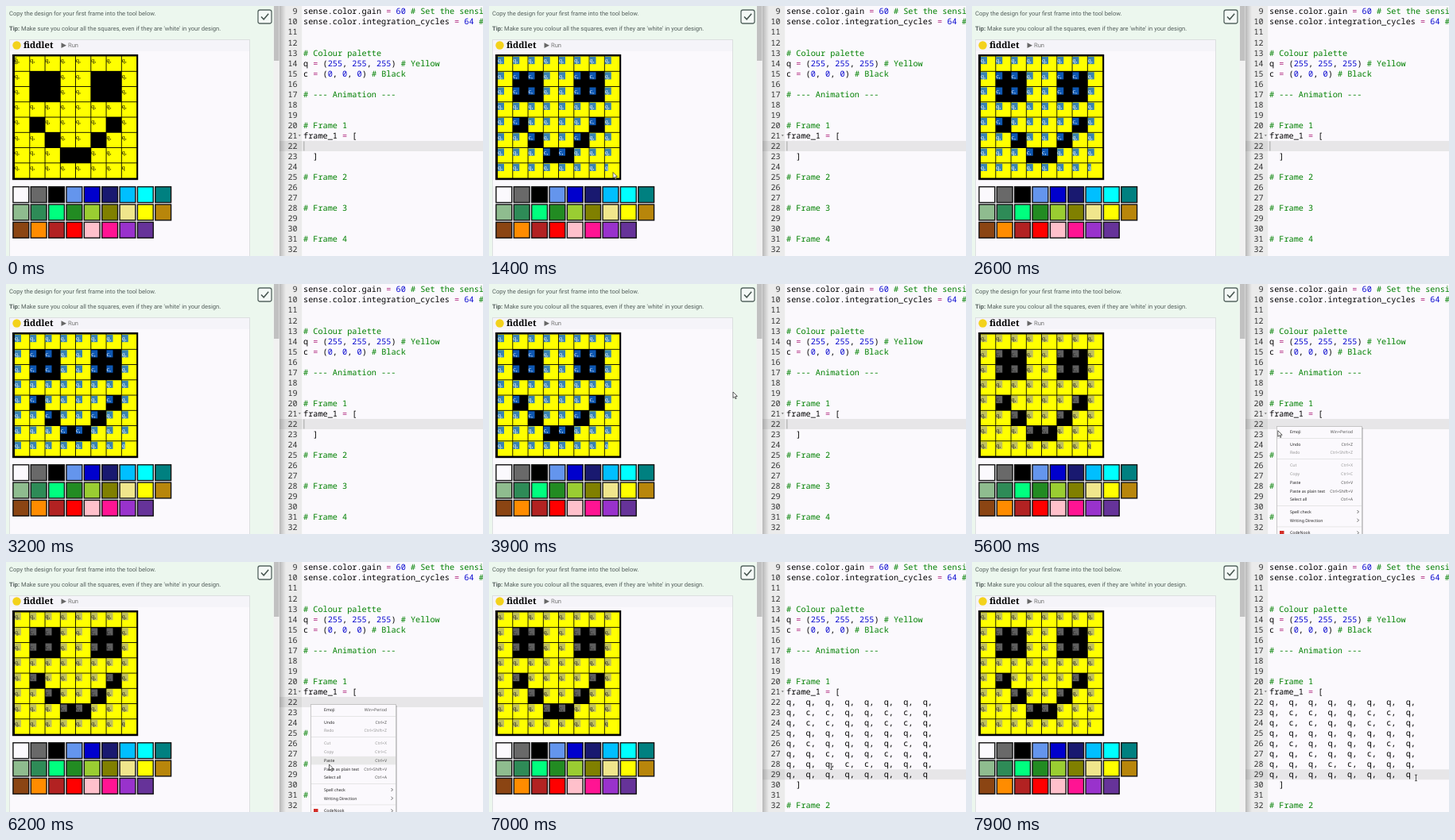
Recreate the animation shown at these times as an HTML page. Size 600 px wide and 315 px high, loop 8 s.

```html
<!DOCTYPE html>
<html lang="en">
<head>
<meta charset="utf-8">
<title>Copying a design into code</title>
<style>
  html, body { margin: 0; width: 100%; height: 100%; overflow: hidden; }
  svg { display: block; width: 600px; height: 315px; }
  text { white-space: pre; text-rendering: geometricPrecision; }
  .ui { font: 7.6px Roboto, sans-serif; fill: #55605d; }
  .brand { font: bold 11.2px "Noto Serif", serif; }
  .code { font: 500 10.23px "Noto Sans Mono", monospace; fill: #000; }
  .num { font: 10.1px "Noto Sans Mono", monospace; fill: #333; text-anchor: end; }
  .comment { fill: #008000; }
  .value { fill: #0a0ad0; }
  .operator { fill: #b0287f; }
  .cell text { font: 8px "Liberation Serif", serif; }
  .cell .mark { fill: none; }
  .cell.on .mark { fill: #1069d6; fill-opacity: .83; }
  .cell.on text { fill: #fff; }
  .idle .cell.on .mark { fill: #989898; fill-opacity: .62; }
  .idle .cell.on text { fill: #222; }
  .menu text { font: 5.2px "Noto Sans", sans-serif; fill: #222; }
  .menu .key { text-anchor: end; fill: #555; }
  .menu .off { fill: #999; }
</style>
</head>
<body>
<svg id="stage" viewBox="0 0 600 315"></svg>
<script>
const LINE = 13.04, CODE_X = 374, PAPER = "#fbf9fd";
const GRID_X = 11, GRID_Y = 63.5, CELL = 19.25;
const FACE = ["qqqqqqqq", "qccqqccq", "qccqqccq", "qqqqqqqq",
              "qcqqqqcq", "qqcqqcqq", "qqqccqqq", "qqqqqqqq"];
const PALETTE = [
  PAPER + " #696969 #000 #6495ed #0000cd #191970 #00bfff #00ffff #008080",
  "#8fbc8f #2e8b57 #00ff7f #228b22 #9acd32 #808000 #f0e68c #ffff00 #b8860b",
  "#8b4513 #ff8c00 #b22222 #ff0000 #ffc0cb #ff1493 #9932cc #663399"];

const rect = (x, y, w, h, fill, more = "") =>
  `<rect x="${x}" y="${y}" width="${w}" height="${h}" fill="${fill}" ${more}/>`;
const text = (x, y, str, cls = "", more = "") =>
  `<text x="${x}" y="${y}" class="${cls}" ${more}>${str}</text>`;
const middle = n => 7 + (n - 9) * LINE;

const KINDS = { "#": "comment", "=": "operator" };
const paint = str => str.replace(/#.*|=|\b\d+\b/g, s =>
  `<tspan class="${KINDS[s[0]] || "value"}">${s}</tspan>`);
const code = lines => Object.entries(lines).map(([n, str]) =>
  text(CODE_X, middle(n) + 3.4, paint(str), "code")).join("");
const activeLine = n =>
  rect(344, middle(n) - 6.5, 28.5, 13, "#dadada") +
  rect(372.5, middle(n) - 6.5, 228, 13, "#e7e6e8");

function designTool() {
  let out = rect(0, 0, 337, 315, "#ecf7ee") +
    text(4, 12.3, "Copy the design for your first frame into the tool below.", "ui") +
    text(4, 31, "<tspan font-weight='bold'>Tip:</tspan> Make sure you colour all the squares, even if they are 'white' in your design.", "ui") +
    rect(317, 5, 17, 17, "#f4f9f6", 'rx="2.5" stroke="#566561" stroke-width="1.3"') +
    '<path d="M321 13.5l3.2 3.3 6-7" fill="none" stroke="#46544f" stroke-width="1.5"/>' +
    rect(336.5, 0, 7.5, 315, "#f1f1f1") + rect(337, 0, 6.5, 69, "#c1c1c1") +
    rect(4.5, 42.5, 302, 280, PAPER, 'stroke="#dcdfe0"') +
    rect(5, 43, 301, 14, "#f5f4f9") +
    '<circle cx="13.5" cy="49.5" r="5.2" fill="#f3d21c"/>' +
    text(22, 53, "fiddlet", "brand") +
    '<path d="M69.5 46.3l6.5 3.4-6.5 3.4z" fill="#666"/>' +
    text(78, 52.3, "Run", "ui", 'style="fill:#777"') +
    rect(8, 61, 158.2, 158.2, "#000");
  FACE.forEach((row, r) => [...row].forEach((ch, c) => {
    const x = GRID_X + c * CELL, y = GRID_Y + r * CELL, last = r * 8 + c === 63;
    out += '<g class="cell">' + rect(x, y, 18.35, 18.35, ch === "q" ? "#ff0" : "#000") +
      `<path class="mark" d="M${x} ${y + .5}h${last ? 4 : 8}v9.2h${last ? -4 : -8}z"/>` +
      text(x, y + 7.9, last ? ch : ch + ",") + "</g>";
  }));
  PALETTE.forEach((row, r) => row.split(" ").forEach((fill, c) => {
    out += rect(8.9 + c * 22.36, 227.8 + r * 22.3, 19.8, 19.8, fill, 'stroke="#111" stroke-width="1.4"');
  }));
  return out;
}

function editor() {
  const pasted = { 30: "  ]", 32: "# Frame 2" };
  FACE.forEach((row, i) => pasted[22 + i] = [...row].join(",  ") + (i < 7 ? "," : ""));
  let numbers = "";
  for (let n = 9; n <= 32; n++) numbers += text(366.5, middle(n) + 3.4, n, "num");
  return '<linearGradient id="shade"><stop stop-opacity=".22"/><stop offset="1" stop-opacity="0"/></linearGradient>' +
    rect(344, 0, 28.5, 315, "#ebebeb") + rect(372.5, 0, 228, 315, PAPER) +
    `<g id="before">${activeLine(22)}${code({ 23: "  ]", 25: "# Frame 2", 28: "# Frame 3", 31: "# Frame 4" })}</g>` +
    `<g id="after">${activeLine(29)}${code(pasted)}</g>` +
    rect(344, 0, 8, 315, "url(#shade)") +
    numbers + '<path d="M367.8 162.2h3l-1.5 2z" fill="#777"/>' +
    code({
      9: "sense.color.gain = 60 # Set the sensitivity",
      10: "sense.color.integration_cycles = 64 # The",
      13: "# Colour palette",
      14: "q = (255, 255, 255) # Yellow",
      15: "c = (0, 0, 0) # Black",
      17: "# --- Animation ---",
      20: "# Frame 1",
      21: "frame_1 = ["
    }) +
    rect(374.3, 170.5, 1.1, 12, "#aaa", 'id="caret"');
}

function menu() {
  const items = [
    ["Emoji", "Win+Period", 186], ["Undo", "Ctrl+Z", 202], ["Redo", "Ctrl+Shift+Z", 212.5, "off"],
    ["Cut", "Ctrl+X", 228.5, "off"], ["Copy", "Ctrl+C", 239, "off"], ["Paste", "Ctrl+V", 250],
    ["Paste as plain text", "Ctrl+Shift+V", 260.7], ["Select all", "Ctrl+A", 271],
    ["Spell check", "", 287], ["Writing Direction", "", 297.7], ["CodeNook", "", 313.5]];
  let out = rect(385, 181, 107, 140, "#000", 'opacity=".18"') +
    rect(383.5, 179.5, 107, 140, PAPER, 'stroke="#bbb" stroke-width=".8"') +
    rect(384, 244.8, 106, 10.6, "#e8e8e8", 'id="hover"');
  for (const y of [194, 220.3, 279, 305.6]) out += rect(384, y, 106, .7, "#ddd");
  for (const [label, key, y, off = ""] of items) {
    out += text(400, y + 1.9, label, off) + text(479, y + 1.9, key, "key " + off);
    if (!key) out += `<path d="M484.5 ${y - 2}l2 2-2 2" fill="none" stroke="#444" stroke-width=".8"/>`;
  }
  return out + rect(387, 311, 5.5, 5.5, "#d32d27");
}

const stage = document.getElementById("stage");
stage.innerHTML = designTool() + editor() +
  `<g id="menu" class="menu">${menu()}</g>` +
  '<path id="arrow" d="M0 0v7.6l1.8-1.6 1.2 2.7 1.2-.5-1.2-2.7h2.4z" fill="#fff" stroke="#222" stroke-width=".7"/>' +
  '<path id="beam" d="M-1.5-3.7h3M0-3.7v7.4M-1.5 3.7h3" fill="none" stroke="#333" stroke-width=".8"/>';

const el = id => document.getElementById(id);
const show = (id, on) => el(id).setAttribute("visibility", on ? "visible" : "hidden");
const cells = [...document.querySelectorAll(".cell")];

// Pointer stops: time, x, y
const PATH = [[100, 12, 69], [1100, 156, 209.5], [3300, 156, 209.5], [3900, 307, 136],
  [4400, 378, 179], [4900, 378, 179], [5200, 383, 179], [5500, 383, 179],
  [6100, 406.5, 255], [6800, 406.5, 255], [7600, 558.5, 272]];

function pointer(t) {
  const i = PATH.findIndex(p => p[0] > t);
  if (i < 1) return PATH.at(i).slice(1);
  const [t0, x0, y0] = PATH[i - 1], [t1, x1, y1] = PATH[i];
  let k = (t - t0) / (t1 - t0);
  k *= k * (3 - 2 * k);
  return [x0 + (x1 - x0) * k, y0 + (y1 - y0) * k];
}

function draw(t) {
  const focused = t >= 4600, open = t >= 5200 && t < 6750, pasted = t >= 6750;
  const [x, y] = pointer(t);

  const col = Math.floor((x - GRID_X) / CELL), row = Math.floor((y - GRID_Y) / CELL);
  const count = t < 1100 ? row * 8 + col + (x > 14 ? 1 : 0) : 64;
  cells.forEach((cell, i) => cell.classList.toggle("on", i < count));
  stage.classList.toggle("idle", focused);

  show("before", !pasted);
  show("after", pasted);
  show("menu", open);
  show("hover", open && y > 244.8);
  show("caret", !focused || t < 5200);
  el("caret").setAttribute("fill", focused ? "#000" : "#aaa");

  const visible = t < 1800 || t >= 3300;
  const beam = t < 1100 || (x > 372 && !open);
  show("beam", visible && beam);
  show("arrow", visible && !beam);
  el(beam ? "beam" : "arrow").setAttribute("transform", `translate(${x} ${y})`);
}

const start = performance.now();
(function tick() {
  draw((performance.now() - start) % 8000);
  requestAnimationFrame(tick);
})();
</script>
</body>
</html>
```
